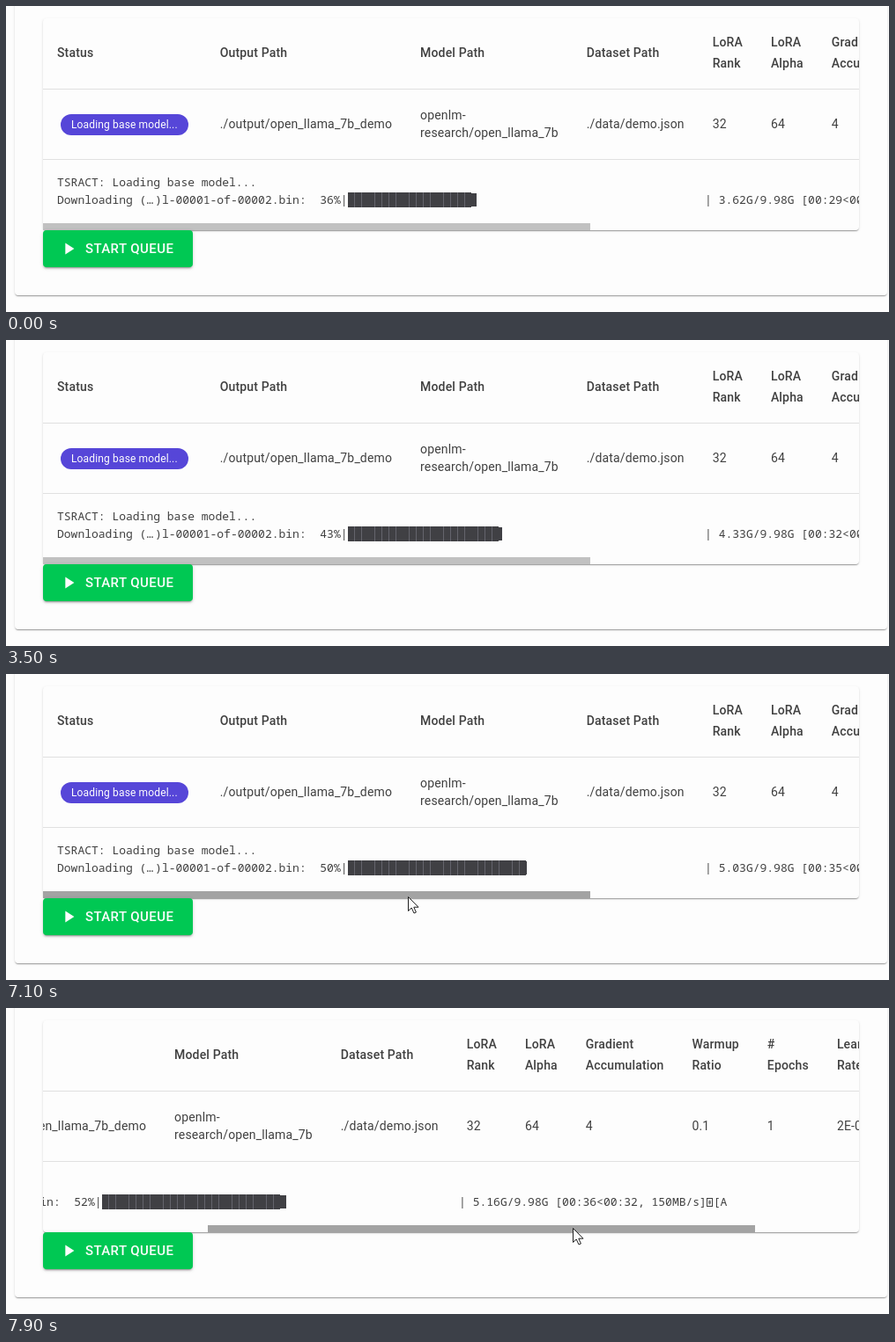
An HTML page for the animation above (8 s loop, 1002 by 348 pixels).

```html
<!DOCTYPE html>
<html lang="en">
<head>
<meta charset="utf-8">
<title>Training queue</title>
<style>
  html, body { margin: 0; width: 100%; height: 100%; overflow: hidden; background: #fdfdfd; }
  body { position: relative; color: #404040; font: 14px/20px Roboto, sans-serif; letter-spacing: .15px; }
  div, svg { position: absolute; white-space: pre; }
  .card { border-radius: 4px; background: #fdfdfd;
    box-shadow: 0 2px 1px -1px rgba(0,0,0,.2), 0 1px 1px rgba(0,0,0,.14), 0 1px 3px rgba(0,0,0,.12); }
  #outer { left: 10px; top: -20px; width: 990px; height: 349px; }
  #paper { left: 42px; top: 14px; width: 926px; height: 241px; overflow: hidden; }
  #strip { left: -42px; top: -14px; }
  table { position: absolute; left: 42px; top: 14px; border-spacing: 0; white-space: pre; }
  th, td { box-sizing: border-box; padding: 0 16px; text-align: left; border-bottom: 1px solid #e0e0e0; }
  th { height: 81px; padding-bottom: 2px; font-weight: 500; line-height: 24px; }
  td { height: 80px; padding-bottom: 1px; }
  #chip { display: block; margin: 1px 4px 0; padding: 0 12px; border-radius: 12px; background: #5646d8;
    color: #fdfdfd; font-size: 12px; line-height: 24px; }
  .mono { font: 13px/20px "Noto Sans Mono", monospace; letter-spacing: 0; }
  #dots { margin-right: 1.9px; }
  #full { left: 387.5px; top: 212px; height: 17px;
    background: repeating-linear-gradient(90deg, #404044 0 7px, #64646c 7px 7.8px); }
  #part { top: 213px; height: 15px; background: #404044; }
  #tofu { display: inline-block; box-sizing: border-box; width: 7px; height: 10px; margin-right: .8px;
    border: 1px solid; background: radial-gradient(#808080 1px, transparent 2px); vertical-align: -1px; }
  #thumb { left: 42px; top: 247px; width: 621px; height: 8px; }
  #button { left: 42px; top: 255px; width: 122px; height: 42px; padding-left: 48px; border-radius: 4px;
    background: #00c853; color: #fdfdfd; font: 500 15px/42px Roboto, sans-serif; letter-spacing: .43px;
    box-shadow: 0 3px 1px -2px rgba(0,0,0,.2), 0 2px 2px rgba(0,0,0,.14), 0 1px 5px rgba(0,0,0,.12); }
  #button svg { left: 18px; top: 10px; }
  #cursor { left: 0; top: 0; overflow: visible; }
</style>
</head>
<body>
<div id="outer" class="card"></div>
<div id="paper" class="card">
  <div id="strip">
    <table>
      <tr><th>Status</th><th>Output Path</th><th>Model Path</th><th>Dataset Path</th><th>LoRA<br>Rank</th><th>LoRA<br>Alpha</th><th>Gradient<br>Accumulation</th><th>Warmup<br>Ratio</th><th>#<br>Epochs</th><th>Learning<br>Rate</th></tr>
      <tr><td><span id="chip">Loading base model...</span></td><td>./output/open_llama_7b_demo</td><td>openlm-<br>research/open_llama_7b</td><td>./data/demo.json</td><td>32</td><td>64</td><td>4</td><td>0.1</td><td>1</td><td>2E-05</td></tr>
    </table>
    <div class="mono" style="left:58px;top:190px">TSRACT: Loading base model...</div>
    <div class="mono" style="left:58px;top:210px">Downloading (<span id="dots">…</span>)l-00001-of-00002.bin:  <span id="percent"></span>%|</div>
    <div id="full"></div>
    <div id="part"></div>
    <div class="mono" id="tail" style="top:210px"><span id="stats"></span><span id="tofu"></span>[A</div>
  </div>
</div>
<div id="thumb"></div>
<div id="button"><svg width="22" height="22" viewBox="0 0 24 24" fill="#fdfdfd"><path d="M8 5v14l11-7z"/></svg>START QUEUE</div>
<svg id="cursor" width="1" height="1">
  <defs><path id="bar" d="M-3-7H-1L0-6L1-7H3M0-6V6M-3 7H-1L0 6L1 7H3"/></defs>
  <path id="arrow" d="M.5 .5V16.5L4.2 13L7 19L9.4 18L6.8 12.2H12Z" fill="#fdfdfd" stroke="#202020"/>
  <g id="beam" fill="none">
    <use href="#bar" stroke="#fdfdfd" stroke-width="3"/>
    <use href="#bar" stroke="#202020"/>
  </g>
</svg>
<script>
const $ = id => document.getElementById(id);
const CELL = 7.8, BAR_X = 387.5, TOTAL = 9.98, LOOP = 8000;
const STEP = 500;                                // time between progress updates
const ENTER = 6200, HOVER = 6900, GRAB = 7200, DROP = 7900;
const DRAG = 187, VIEW = 926, THUMB = 621;

// time, gigabytes done
const progress = [[0, 3.62], [2000, 3.96], [4500, 4.58], [5000, 4.58], [6000, 4.81], [7000, 5.03], [7500, 5.16]];

const mix = (a, b, k) => a + (b - a) * k;
const part = (t, from, to) => Math.min(1, Math.max(0, (t - from) / (to - from)));
const easeOut = (k, power) => 1 - (1 - k) ** power;

function doneAt(t) {
  const i = progress.findIndex(p => p[0] >= t);
  if (i === 0) return progress[0][1];
  const [t0, a] = progress[i - 1], [t1, b] = progress[i];
  return mix(a, b, part(t, t0, t1));
}

function drawProgress(t) {
  const done = doneAt(Math.floor(t / STEP) * STEP);
  const slow = done > 4.6 && done < 4.9;         // a longer speed label shortens the bar by a cell
  const cells = slow ? 51 : 52;
  const eighths = Math.floor(done / TOTAL * cells * 8);
  const full = Math.floor(eighths / 8) * CELL;
  const elapsed = Math.floor(4.3 * done + 14.36);
  const left = Math.round((TOTAL - done) / .15);
  $('percent').textContent = Math.round(done / TOTAL * 100);
  $('full').style.width = full + 'px';
  $('part').style.left = BAR_X + full + 'px';
  $('part').style.width = eighths % 8 / 8 * CELL + 'px';
  $('tail').style.left = BAR_X + cells * CELL + 'px';
  $('stats').textContent = `| ${done.toFixed(2)}G/9.98G [00:${elapsed}<00:${left}, ${slow ? '98.4' : '150'}MB/s]`;
}

function drawPointer(t) {
  const come = easeOut(part(t, ENTER, HOVER), 2);
  const pull = easeOut(part(t, GRAB, DROP), 1.13);
  const x = Math.round(mix(423, 456, come) + DRAG * pull);
  const y = Math.round(mix(196, 253, come) - 3 * pull ** 2);
  const overText = y < 247;
  $('cursor').style.display = t < ENTER ? 'none' : '';
  $('cursor').style.transform = `translate(${x}px,${y}px)`;
  $('beam').style.display = overText ? '' : 'none';
  $('arrow').style.display = overText ? 'none' : '';
}

function drawScroll(t) {
  const offset = Math.round(DRAG * part(t, GRAB, DROP));
  $('thumb').style.transform = `translateX(${offset}px)`;
  $('thumb').style.background = t < HOVER ? '#c1c1c1' : '#a3a3a3';
  $('strip').style.transform = `translateX(${-Math.ceil(offset * VIEW / THUMB)}px)`;
}

function draw(now) {
  const t = Math.floor(now % LOOP / 100) * 100;
  drawProgress(t);
  drawPointer(t);
  drawScroll(t);
}

let start;
function tick(now) {
  start ??= now;
  draw(now - start);
  requestAnimationFrame(tick);
}
draw(0);
requestAnimationFrame(tick);
</script>
</body>
</html>
```
